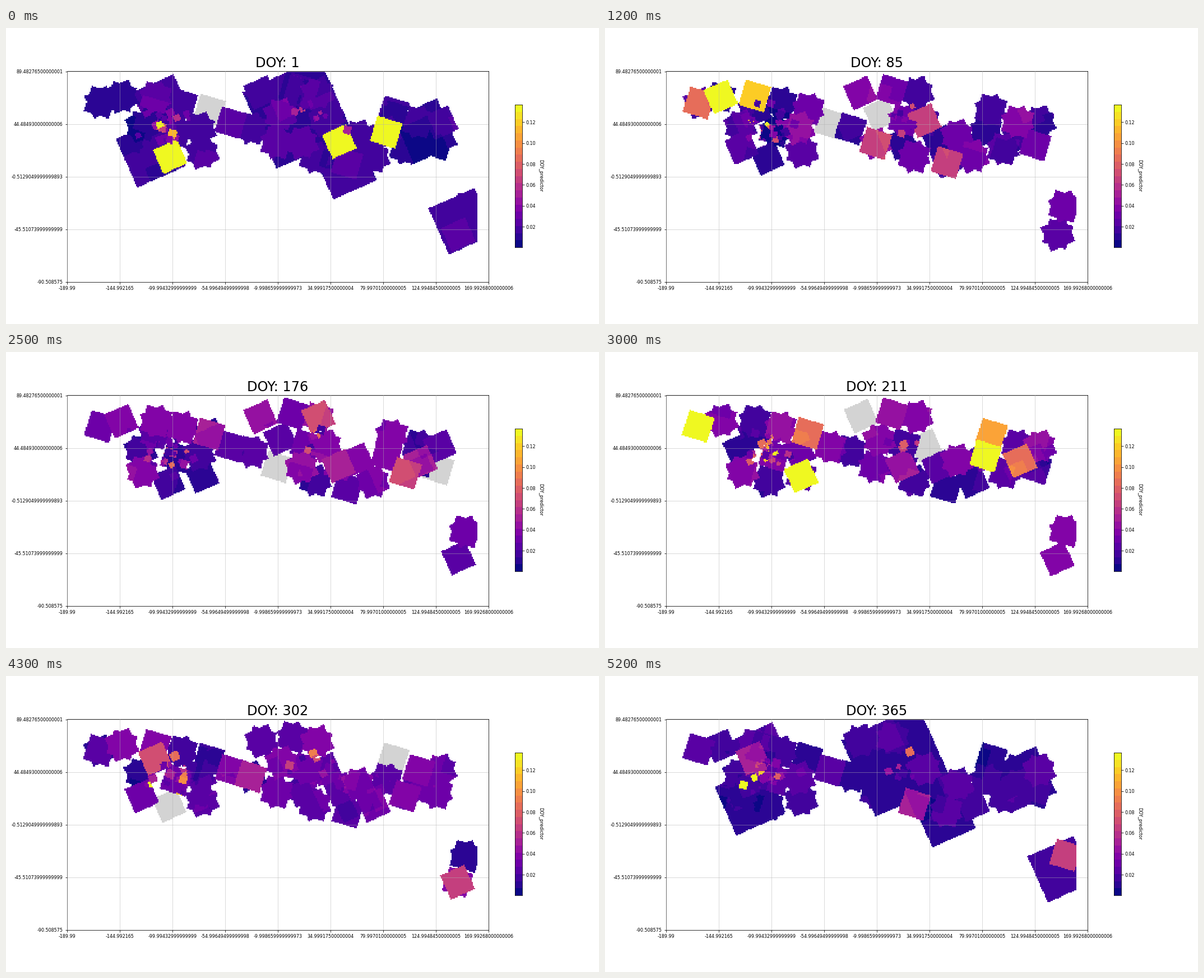
A matplotlib script that plays this animation: 1058 px wide and 529 px high, repeating every 5300 ms.

```python
import numpy as np
import matplotlib.pyplot as plt
from matplotlib.animation import FuncAnimation

W, H, FRAMES, INTERVAL = 1058, 529, 53, 100
LEFT, RIGHT, TOP, BOTTOM = 108.6, 861, 76.6, 453.6
COLS, ROWS = 360, 180
PT = 0.72  # points per pixel at 100 dpi
UP, DN = -24, 17  # the two tilts of the tiles, in degrees
SIDE = 47
NO_DATA = -1

# Each site: centre, tilt, then the weeks in which its value peaks.
SITES = [
    (167, 132, DN, 10, 20, 30, 47), (206, 123, UP, 12), (267, 123, DN, 13, 20),
    (265, 147, UP, 19, 40.5, 49), (313, 135, DN), (362, 146, DN, 28),
    (400, 168, DN, 20), (240, 175, UP), (243, 213, UP), (290, 231, UP, 0),
    (350, 221, UP, 30), (303, 185, DN), (345, 180, UP),
    (454, 115, UP, 20), (512, 110, DN), (556, 116, UP, 22.5),
    (570, 165, UP, 14.5, 47), (437, 178, DN, 40), (490, 155, UP),
    (482, 205, DN, 14.5), (535, 165, DN), (528, 205, UP, 33),
    (552, 230, DN, 49), (608, 242, DN, 14.5), (594, 202, UP, 0, 22, 47),
    (627, 192, UP, 38), (655, 230, UP), (688, 147, DN, 20, 31.5),
    (678, 185, DN, 0, 30, 47), (735, 167, DN), (774, 168, UP, 21, 38),
    (768, 208, DN, 47), (738, 195, UP, 28, 38), (712, 215, DN, 22.5),
    (820, 321, DN, 49.5), (806, 368, UP, 40.5),
]
# Coarse tiles (x, y, side) that fill in around the turn of the year.
WINTER = [(258, 222, 95), (278, 135, 80), (520, 152, 150), (605, 250, 85),
          (745, 185, 90), (812, 345, 90)]
DENSE_AREAS = [(288, 178, 26), (535, 158, 8)]

plt.rcParams["font.family"] = "DejaVu Sans"

xs = LEFT + (np.arange(COLS) + 0.5) * (RIGHT - LEFT) / COLS
ys = TOP + 1 + (np.arange(ROWS) + 0.5) * (BOTTOM - TOP - 1) / ROWS
X, Y = np.meshgrid(xs, ys)


def square(x, y, side, tilt):
    a = np.radians(tilt)
    dx, dy = X - x, Y - y
    u, v = dx * np.cos(a) + dy * np.sin(a), dy * np.cos(a) - dx * np.sin(a)
    return np.maximum(abs(u), abs(v)) < side / 2


def texture(rng):
    """Faint overlapping tiles, as left by averaging many shifted grids."""
    field = np.zeros_like(X)
    for _ in range(40):
        spot = rng.uniform((140, 90), (840, 270))
        field += square(*spot, rng.uniform(24, 75), rng.choice([UP, DN])) * rng.uniform(-4, 4)
    return field


def winter_tiles(frame, rng):
    if min(frame, FRAMES - 1 - frame) <= 3:
        for x, y, side in WINTER:
            yield x, y, side, UP, rng.uniform(6, 14)


def site_tiles(frame, rng):
    """One tile per site, often with a tile of the other tilt behind it."""
    winter = min(frame, FRAMES - 1 - frame) <= 3
    for x, y, tilt, *peaks in SITES:
        low = rng.uniform(5, 20 if winter else 32)
        peak = sum(100 * np.exp(-((frame - p) / 3) ** 2) for p in peaks)
        value = min(100, max(low, peak))
        backed, missing = rng.random() < 0.6, rng.random() < 0.06
        x, y = rng.normal((x, y), 1)
        if missing and value < 40:
            yield x, y, SIDE, tilt, NO_DATA
            continue
        if backed:
            yield x, y, SIDE * 0.94, UP + DN - tilt, low
        yield x, y, SIDE, tilt, value


def dense_tiles(rng):
    """Small tiles crowding the two densely sampled areas."""
    for x, y, count in DENSE_AREAS:
        for spot in rng.normal((x, y), (22, 15), (count, 2)):
            value = min(100, 12 + rng.exponential(20))
            yield (*spot, rng.uniform(7, 16), rng.choice([UP, DN]), value)


def make_field(frame):
    rng = np.random.default_rng(700 + frame)
    tiles = sorted(site_tiles(frame, rng), key=lambda tile: tile[-1])
    field = np.full(X.shape, np.nan)
    for *shape, value in [*winter_tiles(frame, rng), *tiles]:
        # Missing predictions never hide a neighbour's value.
        cover = square(*shape)
        field[cover & np.isnan(field) if value == NO_DATA else cover] = value
    land = field >= 0
    for *shape, value in dense_tiles(rng):
        field[square(*shape) & land] = value
    soft = land & (field < 75)
    field[soft] = np.clip(field + texture(rng), 0, 100)[soft]
    field[X > 839.6] = np.nan
    return field


def place(x0, y0, x1, y1):
    return fig.add_axes([x0 / W, 1 - y1 / H, (x1 - x0) / W, (y1 - y0) / H])


fig = plt.figure(figsize=(W / 100, H / 100), dpi=100, facecolor="white")
cmap = plt.get_cmap("plasma").resampled(20)
cmap.set_under("lightgray")
cmap.set_bad((1, 1, 1, 0))
tick_style = dict(labelsize=8 * PT, length=3.5 * PT, pad=3.5 * PT, width=0.8 * PT)

ax = place(LEFT, TOP, RIGHT, BOTTOM)
image = ax.imshow(make_field(0), cmap=cmap, vmin=0, vmax=100, aspect="auto",
                  interpolation="nearest", extent=(LEFT, RIGHT, BOTTOM, TOP + 1))
ax.set(xlim=(LEFT, RIGHT), ylim=(BOTTOM, TOP))
ax.set_xticks(np.linspace(LEFT, RIGHT, 9), [
    "-189.99", "-144.992165", "-99.99432999999999", "-54.99649499999998",
    "-9.998659999999973", "34.99917500000004", "79.99701000000005",
    "124.99484500000005", "169.99268000000006"])
ax.set_yticks(np.linspace(TOP + 1, BOTTOM, 5), [
    "89.48276500000001", "44.484930000000006", "-0.5129049999999893",
    "-45.51073999999999", "-90.508575"])
ax.tick_params(**tick_style)
ax.set_axisbelow(False)
ax.grid(color="#b0b0b0", alpha=0.6, linewidth=0.8 * PT)
title = ax.set_title("", fontsize=24 * PT, pad=6.5 * PT)

bar = place(908, 137, 921, 392)
bar.imshow(np.arange(20)[:, None], cmap=cmap, aspect="auto", origin="lower",
           interpolation="nearest", extent=(0, 1, 0.0003, 0.1368))
bar.set_xticks([])
bar.set_yticks(np.arange(0.02, 0.13, 0.02))
bar.yaxis.set_major_formatter("{x:.2f}")
bar.yaxis.tick_right()
bar.tick_params(**tick_style)
for spine in [*ax.spines.values(), *bar.spines.values()]:
    spine.set_linewidth(0.8 * PT)
fig.text(954 / W, 1 - 264 / H, "DOY_predictor", rotation=270, fontsize=8 * PT,
         ha="center", va="center")


def update(frame):
    image.set_data(make_field(frame))
    title.set_text(f"DOY: {1 + 7 * frame}")
    return image, title


anim = FuncAnimation(fig, update, frames=FRAMES, interval=INTERVAL, repeat=True)
plt.show()
```
